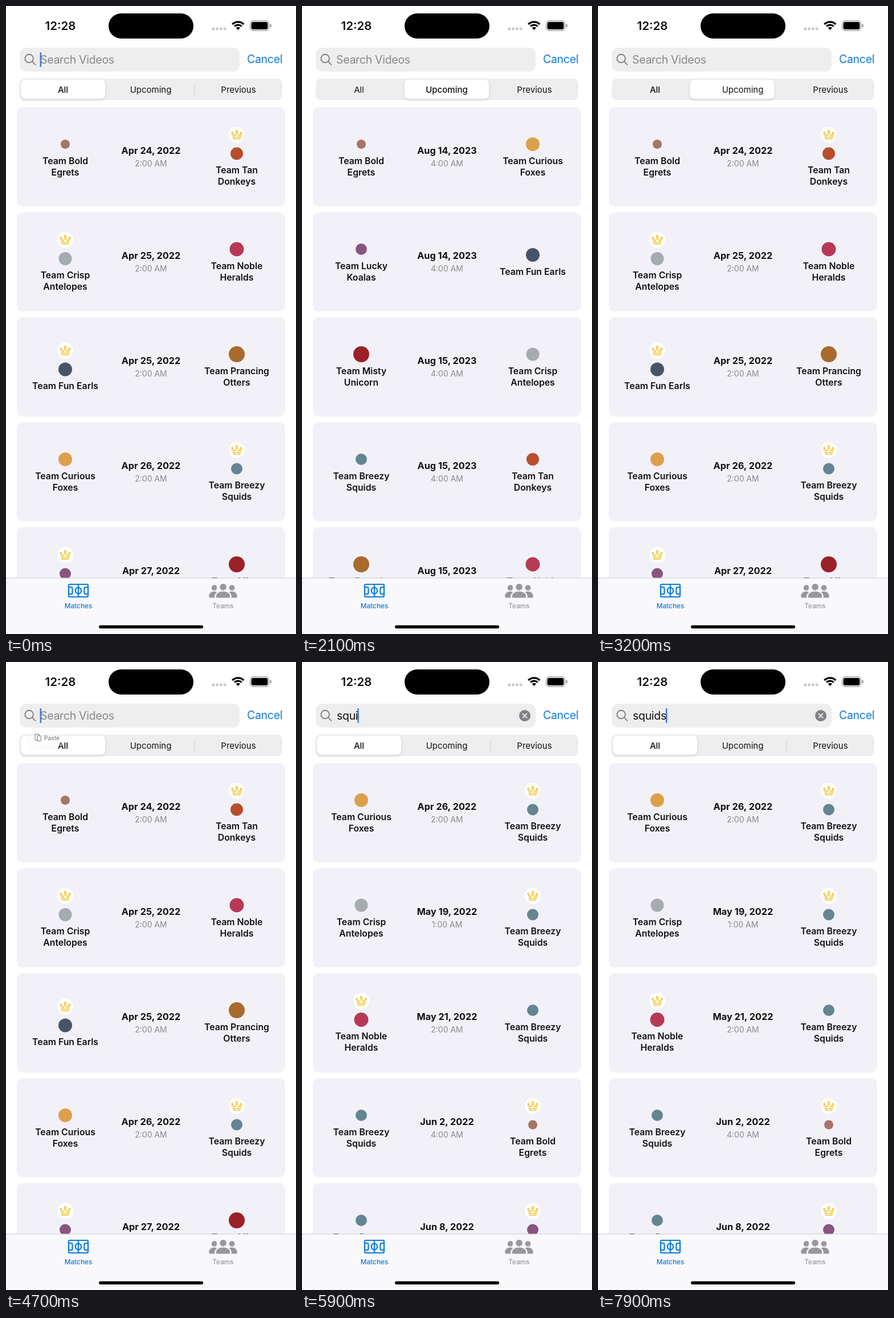
These frames come from a looping animation (509x1100 px, 8000 ms). An HTML page:

```html
<!DOCTYPE html>
<html lang="en">
<head>
<meta charset="utf-8">
<title>Match search</title>
<style>
  html, body { margin: 0; width: 100%; height: 100%; overflow: hidden; background: #fff; }
  svg { display: block; width: 100%; height: 100%; }
  text { font-family: Inter, Roboto, sans-serif; fill: #111; }
  .mid { text-anchor: middle; }
  .team { font-size: 15.8px; font-weight: 600; }
  .date { font-size: 16.3px; font-weight: 700; }
  .time { font-size: 14px; fill: #8a8a8e; }
  .field { font-size: 19.5px; letter-spacing: -.3px; }
  .segment { font-size: 15px; }
  .tab { font-size: 11.8px; font-weight: 500; }
  .blue { fill: #0a7ae0; }
  .grey { fill: #98989c; }
  .line { fill: none; stroke-linecap: round; stroke-linejoin: round; }
</style>
</head>
<body>
<svg viewBox="0 0 509 1100">
  <defs>
    <filter id="soft" x="-20%" y="-40%" width="140%" height="200%">
      <feDropShadow dx="0" dy="2" stdDeviation="2.5" flood-opacity=".14"/>
    </filter>
    <filter id="wide" x="-40%" y="-60%" width="180%" height="240%">
      <feDropShadow dx="0" dy="4" stdDeviation="10" flood-opacity=".2"/>
    </filter>
    <g id="crown">
      <circle r="14" fill="#fff"/>
      <g class="line" stroke="#f3c433" stroke-width="1.5">
        <path d="M-7-1.5L-5.5 7.5H5.5L7-1.5L3.4 1.8L0-4.2L-3.4 1.8ZM-5.6 4.4H5.6"/>
        <circle cx="-7.8" cy="-3.2" r="1.3"/><circle cy="-6.2" r="1.5"/><circle cx="7.8" cy="-3.2" r="1.3"/>
      </g>
    </g>
  </defs>

  <g id="cards"></g>
  <g id="rows"></g>

  <!-- Status bar -->
  <text class="mid" x="95.5" y="42" font-size="20.5" font-weight="600">12:28</text>
  <rect x="180" y="13" width="149" height="44" rx="22"/>
  <g fill="#c8c8ca">
    <circle cx="364" cy="40" r="2.5"/><circle cx="370.7" cy="40" r="2.5"/>
    <circle cx="377.4" cy="40" r="2.5"/><circle cx="384" cy="40" r="2.5"/>
  </g>
  <g transform="translate(407.3 42)">
    <path d="M-10-10A14.2 14.2 0 0 1 10-10M-6.3-6.3A8.9 8.9 0 0 1 6.3-6.3" fill="none" stroke="#000" stroke-width="3.2"/>
    <path d="M0 0L-3.7-3.7A5.2 5.2 0 0 1 3.7-3.7Z"/>
  </g>
  <rect x="428.5" y="26" width="33" height="17" rx="5.2" fill="none" stroke="#a2a2a4" stroke-width="1.3"/>
  <rect x="430.5" y="28" width="29" height="13" rx="3.4"/>
  <path d="M463 31.5a3 3 0 0 1 0 6z" fill="#a2a2a4"/>

  <!-- Search field -->
  <rect x="24" y="73" width="386" height="42" rx="12" fill="#eee"/>
  <g class="line" stroke="#808085" stroke-width="1.9">
    <circle cx="40.7" cy="92" r="7.2"/><path d="M46 97.3L51.5 102.8"/>
  </g>
  <text id="hint" class="field" x="60" y="101.3" style="fill:#88888c">Search Videos</text>
  <text id="typed" class="field" x="61" y="101.3"></text>
  <rect id="caret" x="59.5" y="81" width="2.6" height="26" rx="1.3" fill="#4a7bd8"/>
  <g id="clear">
    <circle cx="391" cy="94" r="10" fill="#808085"/>
    <path d="M387.4 90.4l7.2 7.2m0-7.2l-7.2 7.2" class="line" stroke="#f4f4f4" stroke-width="1.8"/>
  </g>
  <text class="field blue" x="423" y="100">Cancel</text>

  <!-- Filter -->
  <rect x="24" y="127" width="461" height="38" rx="9" fill="#eee"/>
  <g fill="#d3d3d6">
    <rect class="divider" x="177" y="136" width="1.2" height="21"/>
    <rect class="divider" x="330.5" y="136" width="1.2" height="21"/>
  </g>
  <rect id="thumb" x="26" y="129" width="148" height="33.5" rx="8" fill="#fff" filter="url(#soft)"/>
  <text class="mid segment" x="100" y="151.5">All</text>
  <text class="mid segment" x="254" y="151.5">Upcoming</text>
  <text class="mid segment" x="408" y="151.5">Previous</text>

  <!-- Paste menu -->
  <g id="menu">
    <rect id="bubble" x="-54" y="4" width="108" height="46" rx="11" fill="#fafafa" filter="url(#wide)"/>
    <g id="paste">
      <g class="line" stroke="#222" stroke-width="1.8">
        <path d="M-29 33h-7a2 2 0 0 1-2-2v-14a2 2 0 0 1 2-2h9a2 2 0 0 1 2 2v3"/>
        <rect x="-31" y="20" width="11" height="16" rx="2"/>
      </g>
      <text x="-10" y="33.5" font-size="18.3">Paste</text>
    </g>
  </g>

  <!-- Tab bar -->
  <rect y="1002" width="509" height="98" fill="#f9f9fb"/>
  <rect y="1001.5" width="509" height="1" fill="#cdcdd1"/>
  <g class="line" transform="translate(127 1024)" stroke="#0a7ae0" stroke-width="2.2">
    <rect x="-17" y="-11" width="34" height="22" rx="2"/>
    <circle r="5.3"/>
    <path d="M0-11V11M-17-6h4.5a2 2 0 0 1 2 2V4a2 2 0 0 1-2 2H-17M17-6h-4.5a2 2 0 0 0-2 2V4a2 2 0 0 0 2 2H17"/>
  </g>
  <text class="mid tab blue" x="127" y="1055">Matches</text>
  <g class="grey" transform="translate(381 1024)">
    <circle cx="-15.5" cy="-5" r="4.8"/><circle cx="15.5" cy="-5" r="4.8"/><circle cy="-6.3" r="5.8"/>
    <path d="M-11.5 12.5C-14.5 5 -6 1.5 0 1.5S14.5 5 11.5 12.5Z"/>
    <path id="side" d="M-14.5 12.5H-24C-27 6-21 1.5-15.5 1.5C-13.5 1.5-12 2-10.6 2.8C-14 5-15.2 9-14.5 12.5Z"/>
    <use href="#side" transform="scale(-1 1)"/>
  </g>
  <text class="mid tab grey" x="381" y="1055">Teams</text>
  <rect x="163" y="1084.7" width="183" height="5.6" rx="2.8"/>
</svg>

<script>
const LOOP = 8000, ROW_TOP = 177, ROW_STEP = 184, ROW_COUNT = 5;
const $ = id => document.getElementById(id);

// Name lines, badge colour, badge radius
const teams = {
  egrets: [['Team Bold', 'Egrets'], '#a8736b', 8],
  donkeys: [['Team Tan', 'Donkeys'], '#b94e2c', 11],
  antelopes: [['Team Crisp', 'Antelopes'], '#a6abb2', 11.5],
  heralds: [['Team Noble', 'Heralds'], '#b53a56', 12.5],
  earls: [['Team Fun Earls'], '#46546a', 12],
  otters: [['Team Prancing', 'Otters'], '#a9692f', 14],
  foxes: [['Team Curious', 'Foxes'], '#dda04a', 12],
  squids: [['Team Breezy', 'Squids'], '#648690', 10],
  koalas: [['Team Lucky', 'Koalas'], '#875580', 10],
  unicorn: [['Team Misty', 'Unicorn'], '#9c2028', 14]
};

// Left team, right team, date, time; * marks the winner
const lists = {
  all: [
    ['egrets', 'donkeys*', 'Apr 24, 2022', '2:00 AM'],
    ['antelopes*', 'heralds', 'Apr 25, 2022', '2:00 AM'],
    ['earls*', 'otters', 'Apr 25, 2022', '2:00 AM'],
    ['foxes', 'squids*', 'Apr 26, 2022', '2:00 AM'],
    ['koalas*', 'unicorn', 'Apr 27, 2022', '2:00 AM']
  ],
  upcoming: [
    ['egrets', 'foxes', 'Aug 14, 2023', '4:00 AM'],
    ['koalas', 'earls', 'Aug 14, 2023', '4:00 AM'],
    ['unicorn', 'antelopes', 'Aug 15, 2023', '4:00 AM'],
    ['squids', 'donkeys', 'Aug 15, 2023', '4:00 AM'],
    ['otters', 'heralds', 'Aug 15, 2023', '4:00 AM']
  ],
  found: [
    ['foxes', 'squids*', 'Apr 26, 2022', '2:00 AM'],
    ['antelopes', 'squids*', 'May 19, 2022', '1:00 AM'],
    ['heralds*', 'squids', 'May 21, 2022', '2:00 AM'],
    ['squids', 'egrets*', 'Jun 2, 2022', '4:00 AM'],
    ['squids', 'koalas*', 'Jun 8, 2022', '4:00 AM']
  ]
};

const label = (kind, x, y, str) => `<text class="mid ${kind}" x="${x}" y="${y}">${str}</text>`;

function teamMarkup(key, x) {
  const won = key.endsWith('*');
  const [lines, color, r] = teams[key.replace('*', '')];
  const y = 65 + (lines.length === 1 ? 10 : 0) + (won ? 16.5 : 0);
  return (won ? `<use href="#crown" x="${x}" y="${y - 33}"/>` : '') +
    `<circle cx="${x}" cy="${y}" r="${r}" fill="${color}"/>` +
    lines.map((line, i) => label('team', x, y + 34.8 + i * 19.7, line)).join('');
}

const rowMarkup = ([left, right, date, time], i) =>
  `<g transform="translate(0 ${ROW_TOP + i * ROW_STEP})">` +
  teamMarkup(left, 104) + teamMarkup(right, 405) +
  label('date', 254.5, 82, date) + label('time', 254.5, 104.3, time) + '</g>';

$('cards').innerHTML = Array.from({ length: ROW_COUNT }, (_, i) =>
  `<rect x="19" y="${ROW_TOP + i * ROW_STEP}" width="471" height="174" rx="10" fill="#f2f1f7"/>`).join('');
$('rows').innerHTML = Object.values(lists).map(list => `<g>${list.map(rowMarkup).join('')}</g>`).join('');
const cards = [...$('cards').children];
const rowNodes = {};
Object.keys(lists).forEach((name, i) => rowNodes[name] = [...$('rows').children[i].children]);

const clamp = v => Math.min(1, Math.max(0, v));
const ramp = (t, from, to) => clamp((t - from) / (to - from));
const ease = x => x * x * (3 - 2 * x);

function track(points, t) {
  let value = points[0][1];
  for (let i = 1; i < points.length; i++) {
    const [t0, v0] = points[i - 1], [t1, v1] = points[i];
    if (t >= t0) value = v0 + (v1 - v0) * ramp(t, t0, t1);
  }
  return value;
}

const caretBlink = [[0, 1], [250, 1], [490, 0], [3960, 0], [4000, 1], [4250, 1], [4490, 0], [4640, 0],
  [4690, 1], [4960, 1], [5190, 0], [5380, 0], [5390, 1], [7250, 1], [7490, 0], [7810, 0], [7880, 1]];
const keyTimes = [5400, 5520, 5680, 5800, 6500, 7000];
const query = 'squids';

// Segment moves: start, from, to
const moves = [[1020, 0, 1], [2150, 1, 2], [2985, 2, 0]];
const fades = [[1150, 1600, 'all', 'upcoming'], [2160, 2600, 'upcoming', 'all'], [5500, 5880, 'all', 'found']];
const segments = [...document.querySelectorAll('.segment')];
const dividers = [...document.querySelectorAll('.divider')];

const latest = (steps, t) => steps.filter(s => t >= s[0]).pop() || steps[0];

function drawList(t) {
  const [start, end, from, to] = latest(fades, t);
  const p = ease(ramp(t, start, end));
  const lingers = i => i === 3;
  // Two half-clear cards let a little white through mid-fade
  cards.forEach((card, i) => card.style.opacity = lingers(i) ? 1 : 1 - p * (1 - p));
  for (const name in rowNodes) {
    rowNodes[name].forEach((node, i) => {
      let opacity = 0;
      if (name === from) opacity = lingers(i) ? 1 - ramp(p, .4, 1) : 1 - p;
      if (name === to) opacity = lingers(i) ? clamp(p * 1.1) : ramp(p, .35, 1);
      node.style.opacity = opacity;
    });
  }
}

function drawFilter(t) {
  const [start, from, to] = latest(moves, t);
  const p = ease(ramp(t, start, start + 400));
  const pos = from + (to - from) * p;
  $('thumb').setAttribute('x', 26 + 154 * pos);
  segments.forEach((s, i) => s.style.fontWeight = i === (p > .25 ? to : from) ? 500 : 400);
  dividers[0].style.opacity = clamp((pos - 1.5) * 2);
  dividers[1].style.opacity = clamp(1 - pos * 1.15);
}

function drawSearch(t) {
  const count = keyTimes.filter(k => t >= k).length;
  const typed = $('typed');
  const str = query.slice(0, count);
  if (typed.textContent !== str) typed.textContent = str;
  $('hint').style.opacity = count ? 0 : 1;
  $('clear').style.opacity = count ? 1 : 0;
  $('caret').setAttribute('x', 59.5 + (count ? typed.getComputedTextLength() + .5 : 0));
  $('caret').style.opacity = track(caretBlink, t);
}

function drawMenu(t) {
  const grow = ramp(t, 4640, 4900), leave = ramp(t, 5390, 5560);
  const scale = .26 + .74 * (1 - (1 - grow) ** 2);
  $('menu').setAttribute('transform', `translate(72.5 118) scale(${scale})`);
  $('menu').style.opacity = grow > 0 ? 1 - leave : 0;
  $('bubble').style.opacity = grow;
  $('paste').style.opacity = clamp(grow * 2.5);
}

const began = performance.now();
function frame() {
  const t = (performance.now() - began) % LOOP;
  drawList(t);
  drawFilter(t);
  drawSearch(t);
  drawMenu(t);
  requestAnimationFrame(frame);
}
frame();
</script>
</body>
</html>
```
